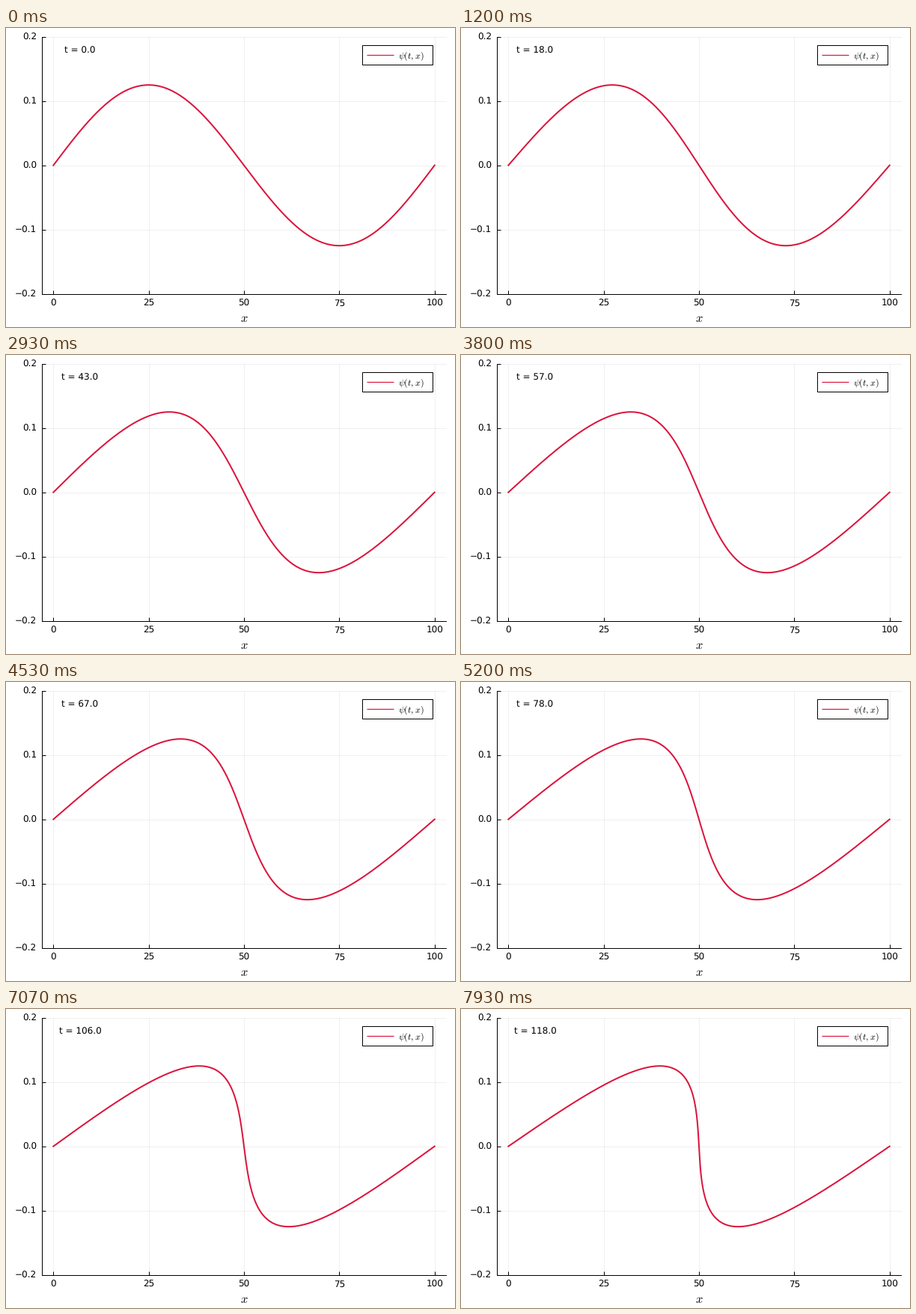
Animation, 600 px wide and 400 px high, one loop 8000 ms. Source, as a matplotlib script:

```python
import numpy as np
import matplotlib.pyplot as plt
from matplotlib.animation import FuncAnimation
from matplotlib.patches import Rectangle

plt.rcParams.update({
    "font.family": "DejaVu Sans",
    "mathtext.fontset": "cm",
    "text.hinting": "none",
})

FRAMES, LOOP_MS = 120, 8000
AMP, LENGTH = 0.125, 100
PT = 0.72  # points per pixel at 100 dpi
RED = "#dc143c"
LEFT, RIGHT, TOP, BOTTOM = 48, 588, 11.7, 355.7

fig = plt.figure(figsize=(6, 4), dpi=100, facecolor="white")
ax = fig.add_axes([0, 0, 1, 1])
ax.set_xlim(0, 600)
ax.set_ylim(400, 0)
ax.axis("off")


def px(x):
    return LEFT + (x + 3) * (RIGHT - LEFT) / 106


def py(y):
    return TOP + (0.2 - y) * (BOTTOM - TOP) / 0.4


def line(xs, ys, color="black", width=1, **kw):
    return ax.plot(xs, ys, color=color, lw=width * PT, **kw)[0]


def label(x, y, text, size=12, ha="center"):
    return ax.text(x, y, text, fontsize=size * PT, ha=ha, va="baseline")


x_ticks = [0, 25, 50, 75, 100]
y_ticks = [-0.2, -0.1, 0.0, 0.1, 0.2]

for v in x_ticks:
    x = px(v)
    line([x, x], [TOP, BOTTOM], alpha=0.06)
    line([x, x], [BOTTOM, BOTTOM - 5], solid_capstyle="butt")
    label(x, 371.6, str(v))
for v in y_ticks:
    y = py(v)
    line([LEFT, RIGHT], [y, y], alpha=0.06)
    line([LEFT, LEFT + 5], [y, y], solid_capstyle="butt")
    label(41, y + 4.4, f"{v:.1f}".replace("-", "\u2212"), ha="right")

line([LEFT, RIGHT], [BOTTOM, BOTTOM])
line([LEFT, LEFT], [TOP, BOTTOM])
label(318, 392.6, "$x$", 16.5)

curve = line([], [], RED, 2, zorder=3)
clock = label(px(7), 33.5, "")

ax.add_patch(Rectangle((476, 23.4), 94.4, 25.6, fc="white", ec="black",
                       lw=PT, zorder=4))
line([482, 518], [36.4, 36.4], RED, 1.2, zorder=5, solid_capstyle="butt")
label(524, 41, r"$\psi(t, x)$", ha="left").set_zorder(5)

start = np.linspace(0, LENGTH, 801)
height = AMP * np.sin(2 * np.pi * start / LENGTH)


def update(t):
    # each point travels at a speed equal to its own height
    curve.set_data(px(start + height * t), py(height))
    clock.set_text(f"t = {t:.1f}")
    return curve, clock


anim = FuncAnimation(fig, update, frames=FRAMES, interval=LOOP_MS / FRAMES,
                     repeat=True, repeat_delay=0)
plt.show()
```
